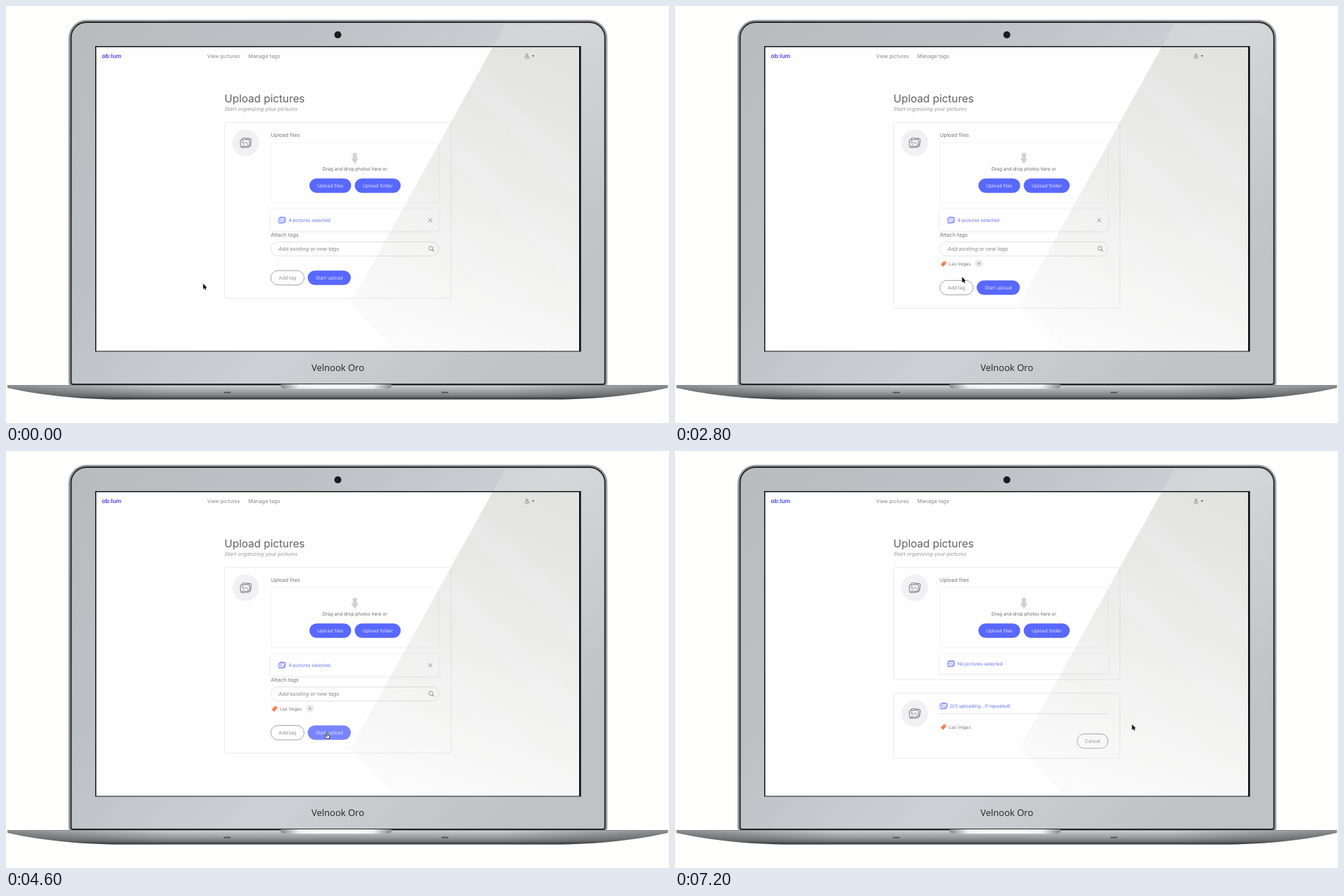
Animation, 944 px wide and 593 px high, one loop 8000 ms. Source, as an HTML page with a canvas:

```html
<!DOCTYPE html>
<html lang="en">
<head>
<meta charset="utf-8">
<title>Picture upload</title>
<style>
html, body { margin: 0; width: 100%; height: 100%; overflow: hidden; background: #fefefc; }
canvas { display: block; }
</style>
</head>
<body>
<canvas id="stage" width="944" height="593"></canvas>
<script>
const ctx = document.getElementById('stage').getContext('2d');
const LOOP = 8000;
const BLUE = '#5968ff', LINK = '#6670f5', GREY = '#777', PAPER = '#fefefe';
const CORAL = '#ff7648', GREEN = '#0b800b', YELLOW = '#fdf500';
const SANS = 'Inter, "Open Sans", sans-serif';
const CARD = 311, LEFT = 377, WIDTH = 239.5, PILL = 20.5;
const TAG_PICKED = 2730, SUBMITTED = 5430, UPLOADING = 7200;
const HOME = [280.5, 394.5];

// Pointer moves: start, end, target x, y
const MOVES = [
  [480, 810, 406.5, 343], [1810, 2330, 408.5, 385], [3030, 3160, 402, 347],
  [3480, 3700, 380, 349], [3700, 3800, 337.5, 357], [4240, 4420, 404, 414],
  [4420, 4600, 457.5, 402], [4600, 4830, 461, 395.5], [5780, 5930, 590, 388],
  [6210, 6330, 650.5, 388.5]
];

function pointerAt(t) {
  let [x, y] = HOME;
  for (const [from, to, tx, ty] of MOVES) {
    const k = Math.min(1, Math.max(0, (t - from) / (to - from)));
    const e = k * k * (3 - 2 * k);
    x += (tx - x) * e;
    y += (ty - y) * e;
  }
  return { x, y };
}

const within = (t, from, to) => t >= from && t < to;

function paint(fill, stroke, width = 1) {
  if (fill) { ctx.fillStyle = fill; ctx.fill(); }
  if (stroke) { ctx.strokeStyle = stroke; ctx.lineWidth = width; ctx.stroke(); }
}

function trace(points) {
  ctx.beginPath();
  points.forEach(([x, y]) => ctx.lineTo(x, y));
  ctx.closePath();
}

function poly(points, ...style) {
  trace(points);
  paint(...style);
}

function box(x, y, w, h, r, ...style) {
  ctx.beginPath();
  ctx.roundRect(x, y, w, h, r);
  paint(...style);
}

function disc(x, y, r, ...style) {
  ctx.beginPath();
  ctx.arc(x, y, r, 0, 2 * Math.PI);
  paint(...style);
}

function line(x0, y0, x1, y1, color, width = 1) {
  poly([[x0, y0], [x1, y1]], null, color, width);
}

function local(x, y, angle, drawShape) {
  ctx.save();
  ctx.translate(x, y);
  ctx.rotate(angle);
  drawShape();
  ctx.restore();
}

function ramp(x0, y0, x1, y1, ...colors) {
  const g = ctx.createLinearGradient(x0, y0, x1, y1);
  colors.forEach((c, i) => g.addColorStop(i / (colors.length - 1), c));
  return g;
}

function label(text, x, y, size, color, style = '', align = 'left', family = SANS) {
  ctx.font = `${style} ${size}px ${family}`;
  ctx.textAlign = align;
  ctx.fillStyle = color;
  ctx.fillText(text, x, y);
}

function floating(alpha, ...shape) {
  ctx.save();
  ctx.shadowColor = `rgba(60,60,80,${alpha})`;
  ctx.shadowBlur = 4;
  ctx.shadowOffsetY = 0.6;
  box(...shape, PAPER);
  ctx.restore();
}

function pill(text, x, y, w, fill, color, stroke) {
  box(x, y, w, PILL, PILL / 2, fill, stroke, 0.9);
  label(text, x + w / 2, y + 12.8, 6.7, color, '', 'center');
}

const solidPill = (text, x, y, w, fill = BLUE) => pill(text, x, y, w, fill, '#dfe2ff');
const linePill = (text, x, y, w) => pill(text, x, y, w, PAPER, '#8a8a8a', '#999');

function cross(x, y, r) {
  for (const s of [-1, 1]) line(x - r, y - r * s, x + r, y + r * s, '#999', 0.9);
}

// Two stacked photos
function photos(x, y, scale, color) {
  local(x, y, 0, () => {
    ctx.scale(scale, scale);
    local(1, -1, 0.12, () => box(-6.5, -5.5, 13, 11, 2, null, color, 1.2));
    local(-1, 1, -0.08, () => {
      box(-6.5, -5.5, 13, 11, 2, '#f6f6f9', color, 1.2);
      disc(-3, -2, 1.2, null, color, 0.9);
      poly([[-5, 4], [2, -2], [5, 4]], null, color, 0.9);
    });
  });
}

function linkRow(text, x, y) {
  photos(x, y, 0.66, LINK);
  label(text, x + 9.2, y + 2.3, 6.6, LINK);
}

function tag(name, x, y, color) {
  local(x, y, -Math.PI / 4, () => {
    box(-4, -2.3, 8, 4.6, [0.8, 2.3, 2.3, 0.8], color);
    disc(2, 0, 0.6, '#fff');
  });
  label(name, x + 7.2, y + 2.3, 6.4, GREY);
}

function badge(y) {
  disc(341.3, y, 19, '#f1f1f4');
  photos(341.3, y, 1, '#8b8b8f');
}

function card(y, h) {
  box(CARD + 0.5, y + 0.5, 322, h, 2, PAPER, '#ebebed');
}

function header() {
  label('ob:lum', 136.5, 74, 8.4, '#4545f5', '600');
  label('View pictures', 286.5, 73.8, 7.25, '#858585');
  label('Manage tags', 345, 73.8, 7.4, '#858585');
  disc(741.8, 69.5, 1.4, null, '#888', 0.8);
  box(739.4, 71.6, 4.9, 2.9, 1, null, '#888', 0.8);
  poly([[748.5, 70], [752.5, 70], [750.5, 72.4]], GREY);
  label('Upload pictures', CARD, 137, 15.3, '#606060');
  label('Start organizing your pictures', CARD, 149, 7.4, '#999', 'italic');
}

function dropZone() {
  badge(194.5);
  label('Upload files', LEFT, 185.8, 7.4, GREY);
  box(LEFT, 194.5, WIDTH, 85, 2, null, '#f4f4f4');
  const mid = LEFT + WIDTH / 2;
  box(mid - 3, 209, 6, 9, 0, '#d3d3d3');
  poly([[mid - 5.3, 217], [mid + 5.3, 217], [mid, 224.5]], '#d3d3d3');
  label('Drag and drop photos here or', mid, 233.8, 6.6, '#686868', '', 'center');
  solidPill('Upload files', 432, 245.3, 59.5);
  solidPill('Upload folder', 496.5, 245.3, 65.5);
}

function selection(text, h) {
  floating(0.13, LEFT, 289, WIDTH, h, 4);
  linkRow(text, 393, 289 + h / 2);
}

function form(t, p) {
  const tagged = t >= TAG_PICKED;
  const row = tagged ? 390.3 : 376.3;
  const hover = within(p.x, 430, 491) && within(p.y, row, row + PILL);
  card(165, row - 126);
  dropZone();
  selection('4 pictures selected', 31);
  cross(604, 304.8, 2.6);
  label('Attach tags', LEFT, 327.5, 7.4, GREY);
  box(LEFT, 335.5, WIDTH, 20, 10, PAPER, '#e0e0e2', 0.9);
  label('Add existing or new tags', 388, 348, 7.4, '#858585', 'italic');
  disc(605, 344.6, 2.8, null, '#888', 0.9);
  line(607, 346.6, 609.3, 349, '#888');
  if (tagged) {
    tag('Las Vegas', 382.8, 366.3, CORAL);
    disc(432.7, 366.3, 5.7, '#ececee');
    cross(432.7, 366.3, 1.6);
  }
  linePill('Add tag', LEFT, row, 47.5);
  solidPill('Start upload', 429.5, row, 61.5, hover ? '#7985ff' : BLUE);
}

function dropdown(items) {
  floating(0.17, 381, 354.5, 231, 59, 1);
  items.forEach(([name, color], i) => tag(name, 392.6, 366 + 21 * i, color));
}

// Flat stand-in for a photo: roofs narrowing upward over dark trees
function castlePhoto(x, y) {
  ctx.save();
  disc(x, y, 19.5, ramp(0, y - 20, 0, y + 20, '#777', '#b4b4b4', '#555'));
  ctx.clip();
  box(x - 20, y + 4, 40, 16, 0, '#383838');
  for (let i = 0; i < 3; i++) {
    const half = 13 - 4 * i, top = y - 2 - 6 * i;
    poly([[x + 2 - half, top + 6], [x + 5 - half, top], [x - 1 + half, top], [x + 2 + half, top + 6]], '#404040');
  }
  ctx.restore();
}

function recent() {
  label('Recent uploads', CARD, 421.5, 11.9, '#606060');
  card(433, 80);
  castlePhoto(341.3, 462.3);
  linkRow('12 pictures uploaded (15 minutes ago)', 382.5, 451.3);
  tag('Japan', 382.8, 469.8, GREEN);
  tag('Vacations', 428.8, 469.8, YELLOW);
  tag('Osaka', 485.8, 469.8, CORAL);
}

function progress() {
  card(344, 92.5);
  badge(373.3);
  linkRow('0/3 uploading...(1 repeated)', 382.5, 362.5);
  line(LEFT, 373.5, LEFT + WIDTH, 373.5, '#e4e4e6');
  tag('Las Vegas', 382.8, 392.2, CORAL);
  linePill('Cancel', 572.5, 402.3, 44);
}

function page(t, p) {
  header();
  if (t < SUBMITTED) {
    form(t, p);
    if (within(t, 820, TAG_PICKED)) dropdown([['Osaka', CORAL], ['Las Vegas', CORAL], ['Japan', GREEN]]);
    if (within(t, 3150, 3790)) dropdown([['Osaka', CORAL], ['Japan', GREEN], ['Tokyo', GREEN]]);
    return;
  }
  card(165, 159.5);
  dropZone();
  selection('No pictures selected', 27);
  t < UPLOADING ? recent() : progress();
}

function arrow() {
  line(2.2, 5, 3.9, 8.8, '#111', 1.6);
  poly([[0, 0], [0, 8], [5.7, 5.7]], '#111', '#fff', 0.3);
}

function beam() {
  line(0, -4, 0, 4, '#555', 0.8);
  for (const y of [-4, 4]) line(-1.6, y, 1.6, y, '#555', 0.7);
}

function hand() {
  box(-2.7, 1.5, 6, 5.5, 2, '#fff', '#222', 0.9);
  box(-1.2, -2, 1.8, 6, 0.9, '#fff', '#222', 0.8);
}

function pointer(t, { x, y }) {
  const overInput = t < SUBMITTED && within(x, 381, 616) && within(y, 335, 355);
  const overItem = t < TAG_PICKED && t > 1830 && y >= 355;
  const overButton = within(t, 4240, 5470) && x > 430 && within(y, 390, 411);
  local(x, y, 0, overInput ? beam : overItem || overButton ? hand : arrow);
}

function glare() {
  ctx.save();
  trace([[693, 58], [817, 58], [817, 491], [557, 491], [490, 424]]);
  ctx.clip();
  ctx.fillStyle = ramp(760, 80, 610, 480, 'rgba(40,40,30,.125)', 'rgba(40,40,30,.075)', 'rgba(40,40,30,.015)');
  ctx.fillRect(480, 58, 340, 434);
  // Diagonal bands keep x - y constant
  for (let c = 150; c < 640; c += 130) {
    poly([[c, 0], [c + 48, 0], [c + 648, 600], [c + 600, 600]], 'rgba(243,243,255,.13)');
  }
  ctx.restore();
}

function lid() {
  box(89.7, 20.3, 766, 519, [25, 25, 3, 3], '#a3a5a8', '#85878a');
  box(92.6, 23, 760.2, 515, [22, 22, 3, 3],
    ramp(92, 22, 700, 540, '#b9bbbd', '#bdc1c6', '#cdd0d4', '#c0c2c5'), '#252628', 1.9);
  poly([[693, 58], [711, 26], [838, 26], [851, 40], [851, 300], [817, 300], [817, 58]],
    ramp(0, 26, 0, 300, 'rgba(255,255,255,.16)', 'rgba(255,255,255,0)'));
  disc(472.5, 41, 5, '#1b1b1d');
  label('Velnook Oro', 472.5, 518.5, 13, '#222', '', 'center', '"Open Sans", "Noto Sans", sans-serif');
}

function base() {
  ctx.beginPath();
  ctx.moveTo(2, 539.5);
  ctx.lineTo(942.5, 539.5);
  ctx.lineTo(942.5, 543);
  ctx.bezierCurveTo(900, 553, 840, 559.5, 780, 559.5);
  ctx.lineTo(165, 559.5);
  ctx.bezierCurveTo(105, 559.5, 45, 553, 2, 543);
  ctx.closePath();
  paint(ramp(0, 539, 0, 560, '#d6d7d9', '#b2b4b7', '#999b9e', '#77797c', '#29292b'));
  const shade = 'rgba(40,42,45,.4)', clear = 'rgba(40,42,45,0)';
  paint(ramp(2, 0, 942, 0, shade, clear, clear, clear, shade));
  line(2, 539.5, 942.5, 539.5, '#85878a', 0.8);
  box(391, 538, 158, 6.3, [0, 0, 5, 5],
    ramp(391, 0, 549, 0, '#85878a', '#f0f0f1', '#f8f8f9', '#f8f8f9', '#f8f8f9', '#f0f0f1', '#85878a'));
  for (const x of [310, 620]) box(x, 548.8, 10, 1.8, 0.9, '#4c4d50');
}

function draw(t) {
  const p = pointerAt(t);
  ctx.textRendering = 'geometricPrecision';
  ctx.fillStyle = '#fefefc';
  ctx.fillRect(0, 0, 944, 593);
  lid();
  base();
  box(127, 57, 691.7, 434.5, 0, '#111');
  ctx.save();
  box(128.5, 58.5, 687.5, 432, 0, PAPER);
  ctx.clip();
  page(t, p);
  glare();
  pointer(t, p);
  ctx.restore();
}

const start = performance.now();
function tick() {
  draw((performance.now() - start) % LOOP);
  requestAnimationFrame(tick);
}
tick();
</script>
</body>
</html>
```
